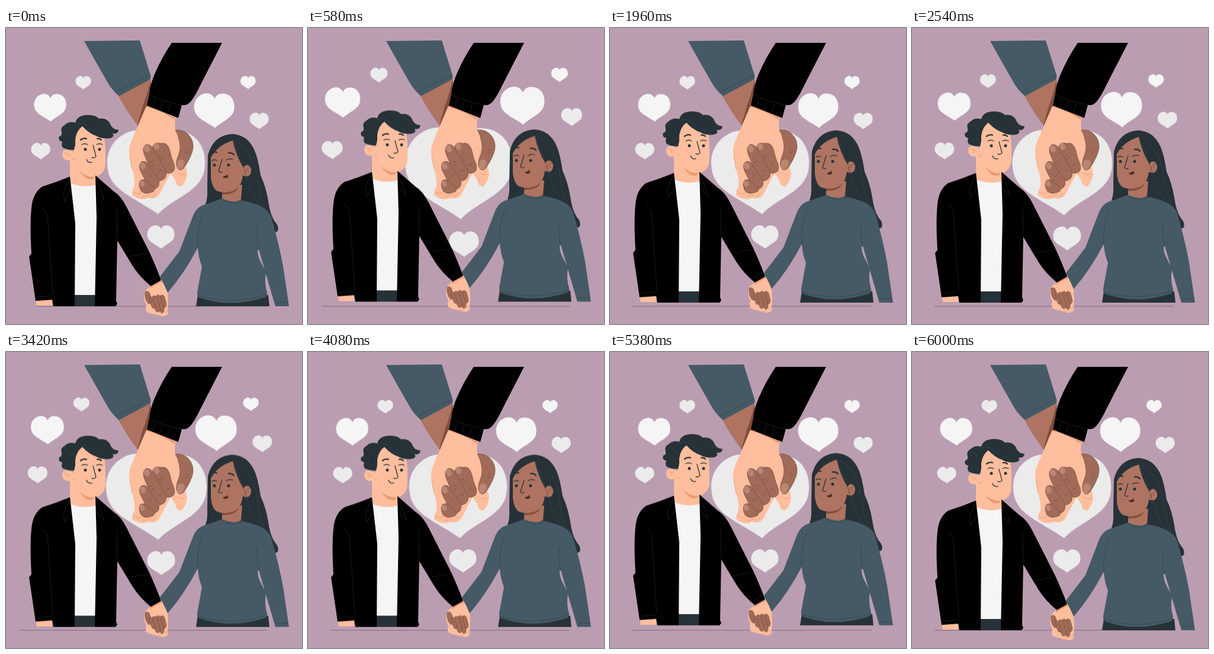
An HTML page for the animation above (6040 ms loop, 500x500 px).

```html
<!DOCTYPE html>
<html lang="en">
<head>
<meta charset="utf-8">
<title>Holding hands</title>
<style>
  html, body { margin: 0; width: 100%; height: 100%; overflow: hidden; background: #bb9db1; }
  svg { display: block; width: 100%; height: 100%; }

  .hearts, .couple, .tip, .end { animation: 6040ms linear infinite; }
  .hearts { transform-origin: 243px 227px; animation-name: beat; animation-timing-function: ease-in-out; }
  .couple { animation-name: float; }
  .tip, .end { animation-timing-function: step-end; }
  .tip { animation-name: tip; }
  .end { animation-name: end; }

  @keyframes beat {
    0%, 31%, 38.3%, 60.5%, 100% { transform: scale(1); }
    10.4%, 25%, 50.2% { transform: scale(1.097); }
    18.5% { transform: scale(1.035); }
  }
  /* four rises of 1.5 s, then a short rest */
  @keyframes float {
    0%, 24.834%, 49.669%, 74.503%, 99.338%, 100% { transform: translateY(0); }
    12.417%, 37.252%, 62.086%, 86.921% { transform: translateY(-10px); }
  }
  @keyframes tip { 0% { opacity: 0; } .6%, 100% { opacity: 1; } }
  @keyframes end {
    0%, 31.4%, 62.4%, 100% { opacity: 0; }
    .6%, 43% { opacity: 1; }
  }

  .soft { fill: #ebebeb; }
  .pale { fill: #f5f5f5; }
  .slate { fill: #455a64; }
  .dark { fill: #263238; }
  .light { fill: #ffbe9d; }
  .blush { fill: #eb996e; }
  .brown { fill: #ae7461; }
  .deep { fill: #7f4d3d; }
  .ink { fill: none; stroke: #263238; stroke-width: 1.3; stroke-linecap: round; stroke-linejoin: round; }
  .seam { fill: none; stroke: #34444c; stroke-width: .8; }
  .fold { fill: none; stroke: #2c3337; stroke-width: .6; }
  .lock { fill: none; stroke: #3d4a51; stroke-width: .6; }
  .crease { fill: none; stroke: #794b3d; stroke-width: .8; stroke-linecap: round; }
  .rose { fill: none; stroke: #eb996e; stroke-width: .9; stroke-linecap: round; }
  .brow { fill: none; stroke: #263238; stroke-width: 2.3; stroke-linecap: round; }
  .finger { fill: #a06b58; stroke: #794b3d; stroke-width: .7; }
  .nail { fill: #b98673; }
  .floor { stroke: #75647a; stroke-width: .9; }
</style>
</head>
<body>
<svg viewBox="0 0 500 500">
  <defs>
    <path id="heart" d="M51 14C45 -1 28 -3 16 5C4 12 -2 26 1 41C4 62 30 70 52 86C66 70 96 63 99 40C102 20 92 5 78 2C65 -1 55 3 51 14Z"/>
  </defs>

  <g class="hearts">
    <use href="#heart" class="soft" transform="translate(170.5 172.5) scale(1.665 1.652)"/>
    <use href="#heart" class="pale" transform="translate(47.3 111) scale(.547)"/>
    <use href="#heart" class="soft" transform="translate(117.3 81) scale(.265)"/>
    <use href="#heart" class="soft" transform="translate(42.3 194) scale(.325)"/>
    <use href="#heart" class="pale" transform="translate(317.5 110) scale(.685)"/>
    <use href="#heart" class="pale" transform="translate(396 81) scale(.258)"/>
    <use href="#heart" class="soft" transform="translate(411.5 143) scale(.323)"/>
    <use href="#heart" class="soft" transform="translate(238.5 333) scale(.462)"/>
  </g>

  <!-- large clasped hands -->
  <g>
    <path class="brown" d="M189 113L244 84Q247 102 241 124L224 167Q205 143 189 113Z"/>
    <path class="deep" d="M244 88Q239 112 232 129L222 164L226 168L246 122Z"/>
    <path class="slate" d="M132 22L226 21L243 76Q246 83 243 87L191 115Q181 107 174 96Q160 72 132 22Z"/>
    <path class="seam" d="M186 108L242 80"/>
    <path class="light" d="M237 132L287 151Q284 163 286 171Q299 176 307 193Q312 208 302 228L306 245Q305 259 296 268Q287 268 286 257L278 245L258 283Q251 290 240 287Q227 293 214 283Q211 280 216 270Q219 262 215 246L208 212Q207 200 213 188Q227 155 237 132Z"/>
    <path class="blush" d="M236 133L240 131L286 151L285 155Q262 139 236 133Z"/>
    <path d="M280 25H365L328 97Q320 114 313 123Q306 132 297 130L291 152L238 131L242 112Q244 94 251 78Q263 50 280 25Z"/>
    <path class="fold" d="M243 113Q270 126 297 130M252 120L248 133M264 124L260 138M277 129L273 143"/>
    <path class="finger" d="M286 172Q303 171 312 185Q319 197 314 211Q308 227 299 238Q292 243 289 235Q286 229 290 218Q296 205 293 192Q291 180 286 172Z"/>
    <path class="nail" d="M289 227Q293 219 301 224Q304 229 297 238Q291 241 289 235Z"/>
    <path class="finger" d="M262 195Q273 192 277 208Q279 219 284 230Q287 241 280 244Q270 249 265 238L248 206Q246 197 254 194Z"/>
    <path class="finger" d="M236 197Q245 195 250 207L270 241Q273 254 262 258Q253 260 248 248L234 215Q229 203 236 197Z"/>
    <path class="finger" d="M229 226Q238 223 242 234L258 256Q261 269 251 272Q243 274 239 265L227 241Q223 231 229 226Z"/>
    <path class="finger" d="M228 257Q236 254 242 263L251 270Q252 277 244 278Q235 282 228 275Q222 262 228 257Z"/>
    <g class="nail">
      <ellipse cx="254" cy="200" rx="4.8" ry="6.2" transform="rotate(-25 254 200)"/>
      <ellipse cx="238" cy="204" rx="4.8" ry="6.2" transform="rotate(-20 238 204)"/>
      <ellipse cx="231" cy="233" rx="4.8" ry="6" transform="rotate(-20 231 233)"/>
      <ellipse cx="230" cy="263" rx="4.2" ry="5.4" transform="rotate(-20 230 263)"/>
    </g>
    <path class="crease" d="M257 217L263 214M260 222L266 218M249 225L243 227M251 230L246 233M246 248L241 251M272 232L277 230M258 242L263 240M304 205L309 207M303 210L307 212"/>
    <path class="rose" d="M215 277Q222 282 229 278M231 284Q239 286 245 280M247 285Q252 283 254 278M290 245Q296 250 302 247M209 216L213 239"/>
  </g>

  <g class="floor">
    <path d="M51 470H442"/>
    <path class="tip" d="M38 470H51"/>
    <path class="end" d="M23 470H38"/>
  </g>

  <g class="couple">
    <!-- woman -->
    <path class="dark" d="M341 215Q350 181 382 179Q408 180 420 207Q426 221 430 249Q439 268 443 292Q446 315 454 327Q462 335 459 343Q449 350 425 340L337 297Q341 288 340 270Z"/>
    <path class="brown" d="M365 265H399L397 290Q381 298 365 290Z"/>
    <path class="deep" d="M365 274Q381 279 393 267Q389 282 365 281Z"/>
    <path class="brown" d="M346 219Q357 198 383 190Q389 217 401 236Q405 229 411 233Q417 240 412 248Q408 253 400 249Q398 267 386 274Q370 281 356 275Q348 270 346 252Z"/>
    <path class="lock" d="M384 190Q398 225 409 259Q416 290 439 309M389 191Q416 209 424 247Q427 283 437 305"/>
    <path class="crease" d="M403 247Q405 237 411 236M407 240L410 243"/>
    <g fill="#263238">
      <circle cx="352" cy="231.5" r="2.5"/>
      <circle cx="376" cy="231.5" r="2.5"/>
    </g>
    <path class="brow" d="M348 212Q352 208 356 210M376 211Q382 210 385 214"/>
    <path class="ink" d="M365 222L359 242Q361 245 365 243M348 224Q352 221 356 224M372 223Q377 220 383 222"/>
    <path fill="#4d2a25" d="M366 252Q369 249 371 250L374 247Q374 250 376 251Q372 256 366 252Z"/>

    <path class="dark" d="M324 451H443L445 470H321Z"/>
    <path class="slate" d="M365 288Q382 296 398 291Q422 296 432 302Q444 308 448 319Q461 364 468 402L478 470H455L427 374L425 376C425 392 436 402 439 414Q436 432 441 447Q442 452 437 455Q378 474 326 455Q321 453 324 441L331 403Q325 388 324 371Q301 415 273 447L260 420L293 377L316 317Q323 300 340 297Z"/>
    <path class="seam" d="M333 313Q321 342 324 372M424 336Q423 359 427 375M365 290Q383 300 400 293M324 452Q382 469 440 450M456 464L477 463"/>

    <!-- man -->
    <path class="light" d="M108 222H147L152 250V266Q130 274 108 265Z"/>
    <path class="blush" d="M122 236Q133 251 150 250Q148 258 138 255Q126 249 122 236Z"/>
    <path class="light" d="M116 181L122 160H150L165 180Q167 190 168 205V229Q167 247 151 251Q134 253 123 240L116 220Q107 225 101 223Q94 219 95 212Q96 204 105 206L114 209Z"/>
    <path class="rose" d="M99 211Q106 210 109 217M103 213L104 217"/>
    <path class="dark" d="M115 206Q104 206 98 203Q92 201 95 192Q87 190 90 183Q95 183 94 176Q91 168 99 164Q106 157 117 160Q120 148 136 147Q151 146 157 153Q169 151 175 160Q179 172 190 172Q189 180 180 178Q184 184 176 186Q162 188 152 182Q140 178 129 166Q119 173 117 188V197Z"/>
    <path class="lock" d="M118 162Q128 158 138 166Q150 177 164 179M158 154Q169 161 178 175M98 169Q108 168 111 180"/>
    <g fill="#263238">
      <circle cx="134" cy="205" r="2.5"/>
      <circle cx="158" cy="205" r="2.5"/>
    </g>
    <path class="brow" d="M126 189Q131 185 136 187M154 187Q158 186 161 189"/>
    <path class="ink" d="M147 198L152 217Q150 220 145 219M128 197Q133 194 138 197M153 197Q158 194 163 197M136 222Q138 228 145 227"/>

    <path class="light" d="M50 459L78 458V469H52Z"/>
    <path class="dark" d="M114 447H153V470H114Z"/>
    <path class="pale" d="M108 262Q130 271 152 265L154 300L151 451H115Z"/>
    <path d="M108 251Q112 285 117 330L116 470H80L78 459L50 461L39 386L43 381Q40 333 43 304Q45 279 61 268Q86 260 108 251Z"/>
    <path d="M151 249L182 276Q194 283 204 303L241 376Q252 399 262 426L246 437Q226 421 214 402L188 359L186 461L188 466L185 470H150L153 320Z"/>
    <path class="fold" d="M108 253L97 277L99 293L109 276M152 253L166 290L158 283L154 274M61 304L70 315L79 450M51 455L77 452M188 361L187 307M209 386L236 381M241 429L258 419"/>

    <!-- joined hands -->
    <path class="light" d="M243 437L263 426Q269 437 273 447L274 463L273 484Q267 489 260 486L240 481Q234 479 237 467Q232 460 234 448Q236 441 243 437Z"/>
    <path class="blush" d="M243 437L263 426L264 429Q254 432 244 440Z"/>
    <path class="finger" d="M235 446Q239 443 242 447L246 458Q246 466 241 466Q234 459 235 446Z"/>
    <path class="finger" d="M261 452Q266 449 268 455L271 467Q270 473 266 473Q261 465 261 452Z"/>
    <path class="finger" d="M254 452Q258 449 261 454L267 475Q267 482 262 481Q256 472 254 452Z"/>
    <path class="finger" d="M247 454Q251 450 255 455L261 475Q259 482 254 479Q248 470 247 454Z"/>
    <path class="finger" d="M242 455Q245 452 248 457L252 470Q250 475 247 472Q243 465 242 455Z"/>
    <path class="rose" d="M258 484Q262 487 265 481M268 480Q272 481 273 476"/>
  </g>
</svg>
</body>
</html>
```
